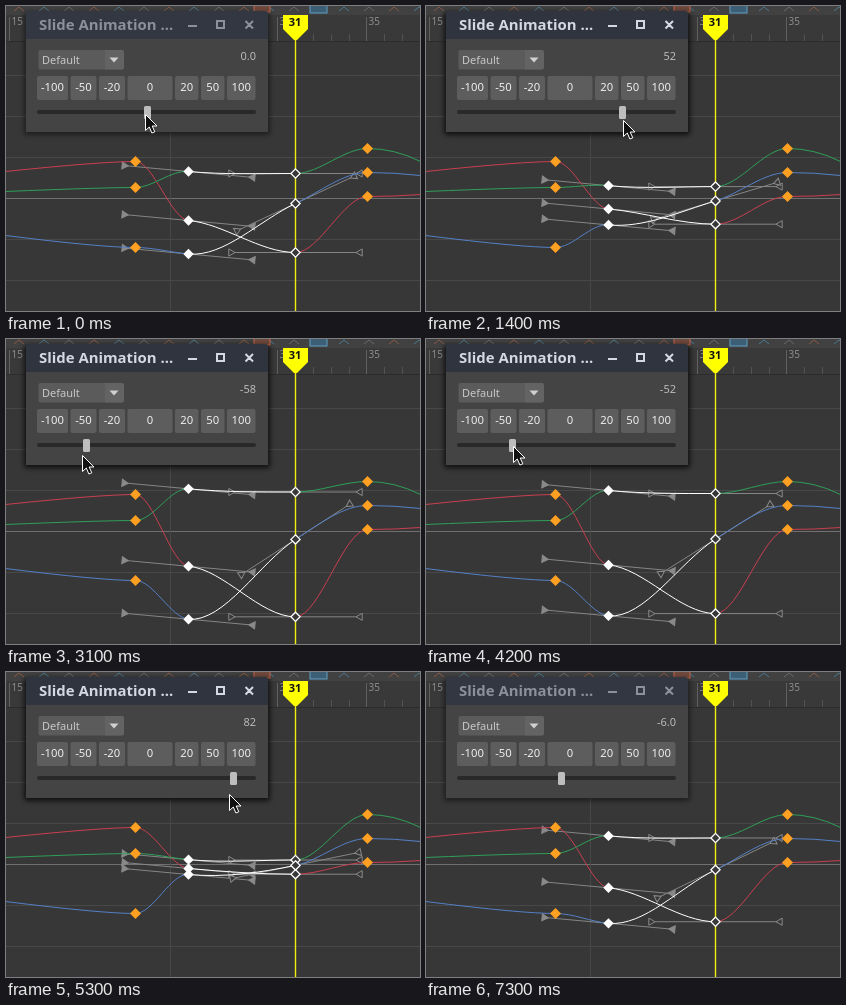
Animation, 414 px wide and 305 px high, one loop 7.4 s. Source, as an HTML page:

```html
<!DOCTYPE html>
<html lang="en">
<head>
<meta charset="utf-8">
<title>Slide Animation</title>
<style>
html, body { margin: 0; width: 100%; height: 100%; overflow: hidden; background: #373737; }
svg { display: block; width: 414px; height: 305px; }
text { font: 11.3px "Noto Sans", "Open Sans", sans-serif; }
.line { fill: none; stroke-width: 1; }
</style>
</head>
<body>
<svg viewBox="0 0 414 305" xmlns="http://www.w3.org/2000/svg">
  <defs>
    <filter id="blur" x="-10%" y="-15%" width="120%" height="130%"><feGaussianBlur stdDeviation="2.6"/></filter>
  </defs>
  <rect width="414" height="305" fill="#373737"/>
  <g id="grid"></g>
  <g id="toolbar"><rect width="414" height="9" fill="#414141"/></g>
  <g id="ruler"><rect y="9" width="414" height="27" fill="#393939"/></g>

  <g id="curves" transform="translate(.5 .5)"></g>
  <path d="M289.500 33V305" stroke="#f0ee10" stroke-width="1.400"/>
  <path d="M277 9h25v14l-11 11h-3l-11-11z" fill="#ffff00"/>
  <text x="289" y="19.500" text-anchor="middle" fill="#111" style="font-weight:700;font-size:11px">31</text>
  <g id="keys" transform="translate(.5 .5)"></g>

  <g id="window">
    <rect id="shadow" x="18" y="6" width="246" height="123" rx="3" filter="url(#blur)"/>
    <path id="bar" d="M20 33V8q0-3 3-3h236q3 0 3 3v25z"/>
    <rect x="20" y="33" width="242" height="93" fill="#444"/>
    <text id="title" x="33" y="24" style="font-size:14.900px;font-weight:600">Slide Animation ...</text>
    <path id="controls" d="M182 20h9M211 15h7v7h-7zM239.500 15l7.500 7.500m0-7.500l-7.500 7.500" fill="none" stroke-width="2"/>
    <rect x="32.500" y="44" width="85" height="19.500" rx="2" fill="#5b5b5b"/>
    <path d="M99 44h17q2 0 2 2v15.500q0 2-2 2h-17z" fill="#636363"/>
    <path d="M103.500 51.500h9l-4.500 5z" fill="#d0d0d0"/>
    <text x="36" y="58" fill="#c8c8c8" style="font-size:11px">Default</text>
    <text id="value" x="250" y="54" text-anchor="end" fill="#bbb" style="font-size:11px"></text>
    <g id="buttons"></g>
    <rect x="31" y="104" width="219" height="4" rx="2" fill="#292929"/>
    <rect id="knob" x="-3.500" y="100" width="7" height="13" rx="1.500" fill="#bdbdbd"/>
  </g>
  <path id="cursor" d="M.5 .5V16.500L4.300 13 6.900 19 9.800 17.800 7.200 12H12z" fill="#111" stroke="#fff" stroke-width="1"/>
</svg>

<script>
const NS = 'http://www.w3.org/2000/svg';
const $ = id => document.getElementById(id);
const clamp = (v, lo, hi) => Math.min(hi, Math.max(lo, v));
const LOOP = 7400, STEP = 100;
const ZERO = 192;                               // height of curve value zero
const LEFT = 129, KEY = 182, NOW = 289, RIGHT = 361;  // key columns
const FRAME = 17.85;                            // ruler pixels per frame

// Turning points of the drag: time in steps, slider value, pointer height.
const drag = [
  [5, 0, 108], [8, 19, 105], [12, 29, 108], [18, 105, 127], [23, 82, 127],
  [31, -58, 116], [37.5, -132, 111], [42, -52, 107], [46, 2, 109],
  [51, 104, 122], [53, 82, 122], [58, 20, 113], [65, -6, 106]
];
const RELEASE = 65, GONE = 70;

// Left edge, the four key columns and right edge.
const curves = [
  { color: '#c93f50', y: [165, 155, 214, 246, 190, 188] },
  { color: '#2f9f58', y: [185, 181, 165, 167, 142, 155] },
  { color: '#5480c6', y: [229, 241, 247.5, 197, 166, 169], sloped: true }
];

// Smooth interpolation that never overshoots its points.
function smooth(points, t, col) {
  const secant = i => (points[i + 1][col] - points[i][col]) / (points[i + 1][0] - points[i][0]);
  const slope = i => {
    if (i === 0 || i === points.length - 1) return 0;
    const a = secant(i - 1), b = secant(i);
    return a * b > 0 ? 2 * a * b / (a + b) : 0;
  };
  t = clamp(t, points[0][0], points[points.length - 1][0]);
  const i = Math.max(0, points.findIndex(p => p[0] >= t) - 1);
  const a = points[i], b = points[i + 1], h = b[0] - a[0], u = (t - a[0]) / h, w = 1 - u;
  return w * w * ((1 + 2 * u) * a[col] + u * h * slope(i))
       + u * u * ((1 + 2 * w) * b[col] - w * h * slope(i + 1));
}

function add(parent, tag, attrs, text) {
  const el = document.createElementNS(NS, tag);
  for (const name in attrs) el.setAttribute(name, attrs[name]);
  if (text) el.textContent = text;
  return parent.appendChild(el);
}

const move = (el, x, y, deg = 0) => el.setAttribute('transform', `translate(${x} ${y}) rotate(${deg})`);

function buildGrid() {
  for (let y = 69; y < 305; y += 41)
    add($('grid'), 'path', { d: `M0 ${y + .5}H414`, stroke: y === ZERO ? '#707070' : '#484848' });
  add($('grid'), 'path', { d: 'M164.5 36V305', stroke: '#484848' });
}

function buildToolbar() {
  const colors = ['#8a5a45', '#6a6a6a', '#4b7890'];
  for (let i = 0; i < 17; i++) {
    const x = 8 + i * 25;
    add($('toolbar'), 'path', { d: `M${x} 5l5 -4 5 4`, class: 'line', stroke: colors[i * 2 % 3] });
  }
  add($('toolbar'), 'rect', { x: 248, y: -3, width: 16, height: 9, fill: '#70493d', stroke: '#c7674a' });
  add($('toolbar'), 'rect', { x: 304, y: -3, width: 17, height: 10, fill: '#3d5f75', stroke: '#5f9fc4' });
}

function buildRuler() {
  for (let f = 15; f <= 37; f++) {
    const x = Math.round(NOW + (f - 31) * FRAME) + .5, major = f % 5 === 0;
    add($('ruler'), 'path', { d: `M${x} ${major ? 11 : 28}V35`, stroke: major ? '#606060' : '#525252' });
    if (major) add($('ruler'), 'text', { x: x + 2, y: 19, fill: '#8c8c8c', style: 'font-size:10px' }, String(f));
  }
  add($('ruler'), 'path', { d: 'M0 35.5H414', stroke: '#2c2c2c' });
}

function buildButtons() {
  let x = 31;
  for (const n of [-100, -50, -20, 0, 20, 50, 100]) {
    const digits = String(Math.abs(n)).length;
    const width = n ? 13.5 + 5 * digits + (n < 0 ? 2.5 : 0) : 45;
    add($('buttons'), 'rect', { x, y: 70, width, height: 24, rx: 2, fill: '#5d5d5d' });
    add($('buttons'), 'text', { x: x + width / 2, y: 85, 'text-anchor': 'middle', fill: '#eee' }, String(n));
    x += width + 2.5;
  }
}

const triangle = 'M4 0L-2.2 -3.6V3.6z';
const diamond = r => `M0 ${-r}L${r} 0 0 ${r} ${-r} 0z`;

function buildCurves() {
  const tangents = add($('curves'), 'g', {}), lines = add($('curves'), 'g', {});
  const handles = fill => ({
    bar: add(tangents, 'path', { class: 'line', stroke: '#858585' }),
    ends: [0, 1].map(() => add(tangents, 'path', { d: triangle, stroke: '#8a8a8a', fill }))
  });
  for (const c of curves) {
    c.line = add(lines, 'path', { class: 'line', stroke: c.color });
    c.active = add(lines, 'path', { class: 'line', stroke: '#fff' });
    c.h1 = handles('#8a8a8a');
    c.h2 = handles('#373737');
    for (const [x, y] of [[LEFT, c.y[1]], [RIGHT, c.y[4]]])
      move(add($('keys'), 'path', { d: diamond(5.5), fill: '#ffa022' }), x, y);
    c.key1 = add($('keys'), 'path', { d: diamond(5.2), fill: '#fff' });
    c.key2 = add($('keys'), 'path', { d: diamond(4.6), fill: '#373737', stroke: '#fff', 'stroke-width': 1.3 });
  }
}

function placeHandles(h, x, y, slope) {
  const a = Math.atan(slope), dx = 64.5 * Math.cos(a), dy = 64.5 * Math.sin(a), deg = a * 180 / Math.PI;
  h.bar.setAttribute('d', `M${x - dx} ${y - dy}L${x + dx} ${y + dy}`);
  move(h.ends[0], x - dx, y - dy, deg);
  move(h.ends[1], x + dx, y + dy, deg + 180);
}

function segment(x0, y0, s0, x1, y1, s1) {
  const d = (x1 - x0) / 3;
  return `M${x0} ${y0}C${x0 + d} ${y0 + d * s0} ${x1 - d} ${y1 - d * s1} ${x1} ${y1}`;
}

// The slider blends the selected keys towards (or away from) the zero line.
function drawCurves(value) {
  const blend = y => ZERO + (y - ZERO) * (1 - value / 100);
  for (const c of curves) {
    const [start, left, key, now, right, end] = c.y;
    const a = blend(key), b = blend(now);
    const s1 = .092, s2 = c.sloped ? (right - a) / 175 : 0;
    c.line.setAttribute('d', `M-1 ${start}Q95 ${left} ${LEFT} ${left}`
      + segment(LEFT, left, 0, KEY, a, s1)
      + segment(NOW, b, s2, RIGHT, right, 0)
      + `Q388 ${right} 414 ${end}`);
    c.active.setAttribute('d', segment(KEY, a, s1, NOW, b, s2));
    placeHandles(c.h1, KEY, a, s1);
    placeHandles(c.h2, NOW, b, s2);
    move(c.key1, KEY, a);
    move(c.key2, NOW, b);
  }
}

function drawWindow(t, value) {
  const focus = clamp(Math.min((t - 4) / 3, (73 - t) / 3), 0, 1);
  const mix = (from, to) => `rgb(${from.map((v, i) => Math.round(v + (to[i] - v) * focus))})`;
  const ink = mix([139, 144, 154], [211, 217, 226]);
  $('title').setAttribute('fill', ink);
  $('controls').setAttribute('stroke', ink);
  $('bar').setAttribute('fill', mix([51, 55, 66], [47, 52, 63]));
  $('shadow').setAttribute('opacity', .45 + .25 * focus);
  $('value').textContent = value.toFixed(Math.abs(value) < 10 ? 1 : 0);
  move($('knob'), Math.round(141 + value * 1.05) + .5, 0);
}

// The pointer runs slightly ahead of the knob and leaves upwards after release.
function drawCursor(t) {
  const away = clamp((t - RELEASE) / (GONE - RELEASE), 0, 1);
  const x = 139 + 1.05 * smooth(drag, t + .15, 1) - 37 * away;
  const y = smooth(drag, t, 2) - 127 * away;
  move($('cursor'), Math.round(x), Math.round(y));
}

function draw(t) {
  const value = clamp(smooth(drag, t, 1), -100, 100);
  drawCurves(value);
  drawWindow(t, value);
  drawCursor(t);
}

buildGrid();
buildToolbar();
buildRuler();
buildButtons();
buildCurves();

let shown = -1;
function tick() {
  const step = Math.floor(performance.now() % LOOP / STEP);
  if (step !== shown) draw(shown = step);
  requestAnimationFrame(tick);
}
tick();
</script>
</body>
</html>
```
